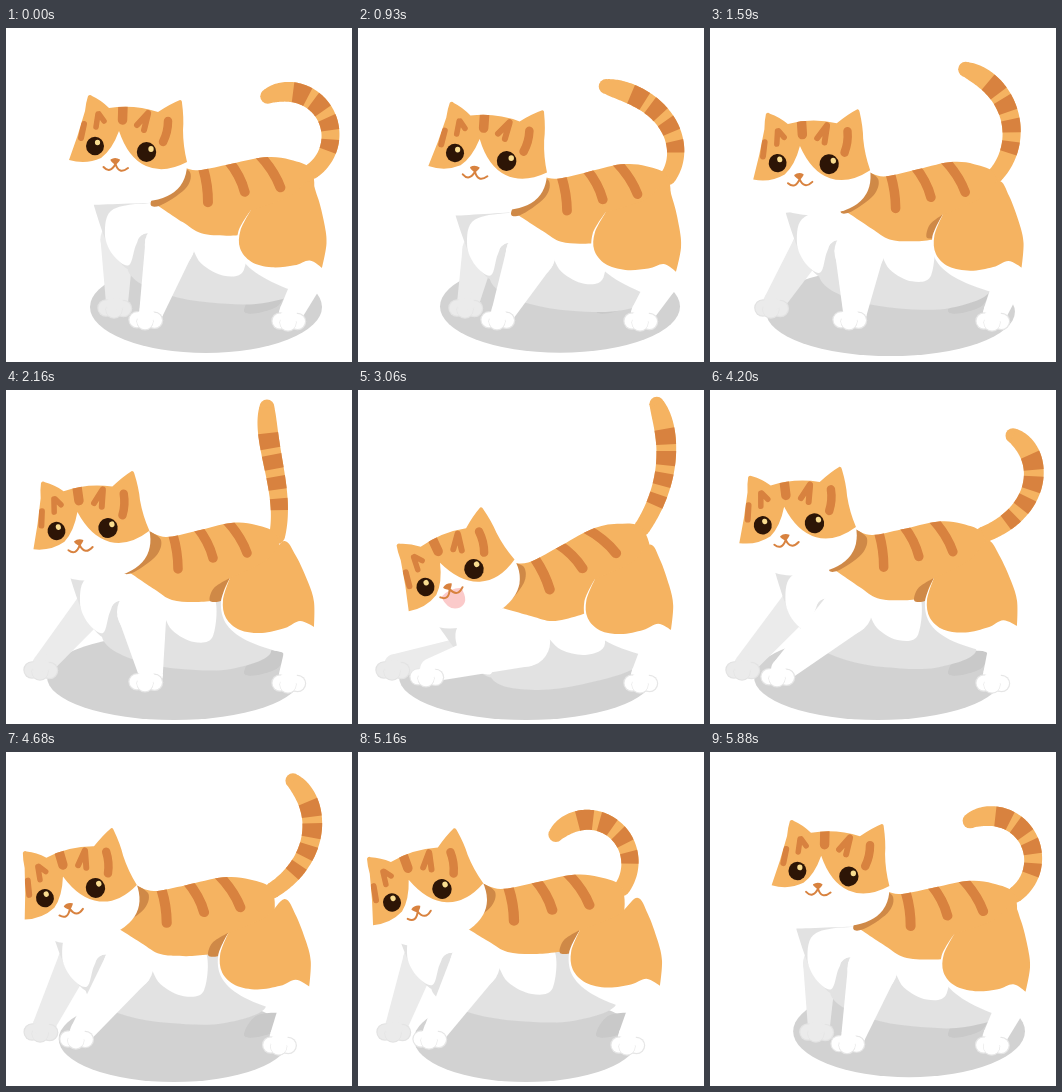
Recreate the animation shown at these times as an HTML page with a canvas. Size 346x334 px, loop 5910 ms.

```html
<!DOCTYPE html>
<html lang="en">
<head>
<meta charset="utf-8">
<title>Walking cat</title>
<style>
html, body { margin: 0; width: 100%; height: 100%; overflow: hidden; background: #fff; }
canvas { display: block; width: 346px; height: 334px; }
</style>
</head>
<body>
<canvas id="stage"></canvas>
<script>
const LOOP = 5910, W = 346, H = 334;
const ORANGE = '#f5b361', RUST = '#d8823f', SHADE_ORANGE = '#cf8947';
const WHITE = '#fff', GREY = '#e2e2e2', PALE = '#ebebeb', FLOOR = '#d2d2d2';
const PAW_EDGE = '#e6e6e6';

const canvas = document.getElementById('stage');
const ctx = canvas.getContext('2d');
const dpr = window.devicePixelRatio || 1;
canvas.width = W * dpr;
canvas.height = H * dpr;

// The cat hangs on three bones, each given by its two ends:
// torso (neck to tail root), hip (groin to rump) and head (eye to eye, then mouth opening).
// Paws are the x of far front, near front and hind; floor is the shadow's x and half width.
const pose = (torso, hip, head, paws, floor) => ({ torso, hip, head, paws, floor });
const stand = pose([172, 136, 306, 143], [245, 182, 316, 240], [89, 118, 140.5, 124, 0], [109, 140, 283], [200, 116]);
const rise = pose([179, 145, 310, 149], [248, 184, 318, 244], [97, 125, 148.6, 133, 0], [108, 140, 283], [202, 120]);
const step = pose([143, 141, 271, 146], [224, 188, 308, 237], [50.5, 141, 102, 138, 0], [35, 140, 283], [168, 127]);
const stretch = pose([151, 172, 284, 138], [237, 189, 313, 240], [67.5, 197, 116, 179, 1], [35, 69, 283], [168, 127]);
const stride = pose([145, 139, 273, 145], [224, 188, 307, 236], [52.8, 135.3, 104.5, 133.3, 0], [33, 68, 283], [168, 124]);
const lean = pose([124, 131, 264, 136], [222, 178, 302, 234], [34, 150.5, 84, 137, 0], [36, 72, 270], [168, 112]);

const mix = (a, b, k) => Object.fromEntries(Object.keys(a).map(
  name => [name, a[name].map((v, i) => v + (b[name][i] - v) * k)]));

const bodyKeys = [
  [0, stand], [930, rise], [1200, mix(rise, step, .08)], [1800, mix(rise, step, .88)],
  [2160, step], [2400, mix(step, stretch, .45)], [3060, stretch],
  [3600, mix(stretch, stride, .12)], [4200, stride], [4800, mix(stride, lean, .85)],
  [5160, lean], [5430, mix(lean, stand, .5)], [5880, mix(lean, stand, .97)]
];

// Tail heading in degrees from upright: at the root, at the tip, and extra bend midway.
const tailKeys = [
  [0, 54, -117, 0], [930, 34, -78, -18], [1450, 45, -80, 0], [2160, 12, 3, -18],
  [3060, 33, -24, 3], [3600, 55, -115, 0], [4200, 68, -62, 18], [4750, 55, -50, 8],
  [5160, 34, -141, 2]
].map(([time, ...tail]) => [time, { tail }]);

// Cyclic Hermite sampling whose slopes never overshoot, so planted paws stay put.
function sample(keys, t) {
  const n = keys.length;
  const at = i => {
    const [time, values] = keys[(i + n) % n];
    return { time: time + Math.floor(i / n) * LOOP, values };
  };
  let i = n - 1;
  while (keys[i][0] > t) i--;
  const [p, a, b, q] = [at(i - 1), at(i), at(i + 1), at(i + 2)];
  const span = b.time - a.time, u = (t - a.time) / span;
  const slope = (l, r) => l * r > 0 ? 2 * l * r / (l + r) : 0;
  const result = {};
  for (const name in a.values) {
    result[name] = a.values[name].map((v, j) => {
      const end = b.values[name][j], d = (end - v) / span;
      const m0 = slope((v - p.values[name][j]) / (a.time - p.time), d) * span;
      const m1 = slope(d, (q.values[name][j] - end) / (q.time - b.time)) * span;
      const s = u * u * (3 - 2 * u);
      return v + (end - v) * s + u * (1 - u) * ((1 - u) * m0 - u * m1);
    });
  }
  return result;
}

// Maps a bone's rest position onto its present one, stretching only along the bone.
function bone(now, rest) {
  const frame = ([x, y, x2, y2]) => new DOMMatrix().translateSelf(x, y)
    .rotateFromVectorSelf(x2 - x, y2 - y).scaleSelf(Math.hypot(x2 - x, y2 - y), 1);
  return frame(now).multiplySelf(frame(rest).inverse());
}

const view = new DOMMatrix([dpr, 0, 0, dpr, 0, 0]);
const use = (matrix = new DOMMatrix()) => ctx.setTransform(view.multiply(matrix));

// Closed smooth outline through x,y pairs; the listed points stay sharp.
function blob(p, ...corners) {
  const n = p.length / 2, path = new Path2D();
  const pt = i => [p[(i + n) % n * 2], p[(i + n) % n * 2 + 1]];
  const tan = i => corners.includes(i % n) ? [0, 0]
    : [0, 1].map(k => (pt(i + 1)[k] - pt(i - 1)[k]) / 6);
  path.moveTo(...pt(0));
  for (let i = 0; i < n; i++) {
    const a = pt(i), b = pt(i + 1), ta = tan(i), tb = tan(i + 1);
    path.bezierCurveTo(a[0] + ta[0], a[1] + ta[1], b[0] - tb[0], b[1] - tb[1], ...b);
  }
  path.closePath();
  return path;
}

// Outlines as drawn in the step pose; the head is drawn in the stand pose.
const shape = {
  belly: blob([112,211, 150,215, 215,205, 222,190, 240,230, 265,262, 225,279, 175,279, 135,272, 104,258, 96,240]),
  chin: blob([63,183, 120,180, 84,194, 98,246, 78,225], 0, 1),
  chest: blob([74,212, 82,187, 125,182, 170,200, 207,205, 207,246, 188,252, 166,240, 150,216, 113,211, 104,222, 97,243, 82,233]),
  back: blob([143,141, 160,147, 190,141, 225,133, 250,135, 271,146, 270,180, 245,205, 212,210, 190,212, 166,210, 148,199, 120,180], 0, 12),
  collar: blob([143,141, 155,150, 150,166, 126,183, 118,178], 0),
  thigh: blob([224,188, 217,210, 220,228, 234,240, 256,243, 279,238, 294,231, 308,237, 308,212, 302,192, 290,166, 278,151, 260,170], 0, 7),
  haunch: blob([224,188, 215,212, 221,235, 244,252, 284,264, 305,262, 308,237], 0, 6),
  fold: blob([0,0, -16,10, -20,23, -7,22, -6,12], 0),
  farHind: blob([250,264, 276,262, 273,277, 252,285, 238,283]),
  face: new Path2D('M63 132Q78 173 128 174Q183 174 181 132L113 100Z'),
  mask: new Path2D('M63 132Q72 108 79 83Q80 74 82 68Q84 66 86 68Q95 72 103 80Q128 76 152 84Q164 76 174 72Q176 72 176 75Q178 90 177 102Q177 118 181 134Q158 146 140 138Q122 130 113 103Q106 122 95 130Q80 137 63 132Z')
};

function fill(path, color) {
  ctx.fillStyle = color;
  ctx.fill(path);
}

function oval(x, y, rx, ry, color) {
  const path = new Path2D();
  path.ellipse(x, y, rx, ry, 0, 0, 7);
  fill(path, color);
}

function line(d, width) {
  ctx.strokeStyle = RUST;
  ctx.lineWidth = width;
  ctx.stroke(new Path2D(d));
}

function clipped(path, draw) {
  ctx.save();
  ctx.clip(path);
  draw();
  ctx.restore();
}

// Tapered limb between two round joints.
function limb(a, ra, b, rb, color) {
  const dx = b.x - a.x, dy = b.y - a.y, d = Math.hypot(dx, dy);
  const nx = -dy / d, ny = dx / d, path = new Path2D();
  for (const [p, r] of [[a, ra], [b, rb], [b, -rb], [a, -ra]])
    path.lineTo(p.x + nx * r, p.y + ny * r);
  fill(path, color);
  oval(a.x, a.y, ra, ra, color);
  oval(b.x, b.y, rb, rb, color);
}

function paw(x, y, color, edge) {
  const toes = [[-9, 0, 7.5], [8.5, 0.5, 7.5], [-1, 1.5, 8]];
  toes.forEach(([dx, dy, r]) => oval(x + dx, y + dy, r + 1.2, r + 1.2, edge));
  toes.forEach(([dx, dy, r]) => {
    oval(x + dx, y + dy, r + .6, r + .6, edge);
    oval(x + dx, y + dy, r, r, color);
  });
  oval(x, y - 4, 10, 6, color);
}

function drawTail(x, y, [root, tip, bend]) {
  const steps = 100, length = 130, left = [], right = [];
  for (let i = 0; i <= steps; i++) {
    const u = i / steps;
    const a = (root + (tip - root) * u + bend * 4 * u * (1 - u)) * Math.PI / 180;
    const r = 8 + 3 * u - 3.5 * u ** 10;
    left.push([x - Math.cos(a) * r, y - Math.sin(a) * r]);
    right.push([x + Math.cos(a) * r, y + Math.sin(a) * r]);
    if (i === 0 || i === steps) oval(x, y, r, r, ORANGE);
    x += Math.sin(a) * length / steps;
    y -= Math.cos(a) * length / steps;
  }
  const band = (from, to, color) => {
    const path = new Path2D();
    left.slice(from, to + 1).concat(right.slice(from, to + 1).reverse())
      .forEach(p => path.lineTo(...p));
    fill(path, color);
  };
  band(0, steps, ORANGE);
  for (let i = 0; i < 4; i++) band(20 + 16 * i, 29 + 17 * i, RUST);
}

function drawHead(open) {
  fill(shape.face, WHITE);
  fill(shape.mask, ORANGE);
  clipped(shape.mask, () => {
    line('M117 76L116.5 92', 9.5);
    line('M78 96L75 110', 6);
    line('M92 86L90 99M93 86L98 93', 5.5);
    line('M142 85L131 97M142 86L138 102', 6);
    line('M162 93Q162 104 157 114', 8.5);
  });
  oval(89, 118, 9, 9.2, '#2d1506');
  oval(140.5, 124, 9.7, 10, '#2d1506');
  oval(91.5, 114.5, 2.6, 2.8, '#f9dc8f');
  oval(145, 121, 2.7, 2.9, '#f9dc8f');
  ctx.translate(0, -5 * open);
  if (open > .02) {
    ctx.save();
    ctx.translate(109.5, 138);
    ctx.scale(.6 + .4 * open, open);
    fill(new Path2D('M-11 1Q0 -3 11 2Q12 19 1 19Q-11 18 -11 1Z'), '#fbcaca');
    ctx.restore();
  }
  fill(new Path2D('M104.5 131.5Q109 128.5 114 131.5Q114 133 109.5 137Q104 133 104.5 131.5Z'), RUST);
  line('M97.5 139Q104 146 109.5 136Q113 147 122 140', 2);
}

function draw(t) {
  const c = sample(bodyKeys, t), { tail } = sample(tailKeys, t);
  const torso = bone(c.torso, step.torso), hip = bone(c.hip, step.hip);
  const joint = (matrix, x, y) => matrix.transformPoint({ x, y });
  const [farX, nearX, hindX] = c.paws, nearY = 282 + nearX * .07;
  const [floorX, floorR] = c.floor, shift = 200 - floorX;

  use();
  ctx.fillStyle = WHITE;
  ctx.fillRect(0, 0, W, H);
  ctx.lineCap = ctx.lineJoin = 'round';
  oval(floorX, 279 + shift / 4, floorR, 46 - shift / 11, FLOOR);
  fill(shape.farHind, '#c9c9c9');
  limb(joint(torso, 86, 217), 17, { x: farX + 2, y: 275 }, 11, PALE);
  paw(farX, 280, PALE, '#e3e3e3');

  use(torso);
  fill(shape.belly, GREY);
  fill(shape.chin, GREY);
  fill(shape.chest, WHITE);

  use();
  limb(joint(torso, 136, 222), 25, { x: nearX + 5, y: nearY - 7 }, 12, WHITE);
  paw(nearX, nearY, WHITE, PAW_EDGE);
  drawTail(c.torso[2], c.torso[3], tail);

  use(torso);
  fill(shape.back, ORANGE);
  clipped(shape.back, () => {
    line('M167 145Q172 162 172 179', 9.5);
    line('M191 137Q203 152 207 168', 9.5);
    line('M220 130Q235 146 241 163', 9.5);
  });

  // The groin fold opens as the hip stretches.
  const [gx, gy, rx, ry] = c.hip;
  const open = Math.min(1, Math.max(.05, (Math.hypot(rx - gx, ry - gy) - 91) / 5));
  use(new DOMMatrix().translate(gx, gy).scale(open, 1));
  fill(shape.fold, SHADE_ORANGE);

  use(hip);
  fill(shape.haunch, WHITE);
  use();
  limb(joint(hip, 296, 250), 15, { x: hindX + 2, y: 285 }, 12, WHITE);
  paw(hindX, 293, WHITE, PAW_EDGE);
  use(hip);
  fill(shape.thigh, ORANGE);

  use(torso);
  fill(shape.collar, SHADE_ORANGE);
  use(bone(c.head.slice(0, 4), stand.head));
  drawHead(c.head[4]);
}

const start = performance.now();
function frame(now) {
  draw(Math.max(0, now - start) % LOOP);
  requestAnimationFrame(frame);
}
draw(0);
requestAnimationFrame(frame);
</script>
</body>
</html>
```
